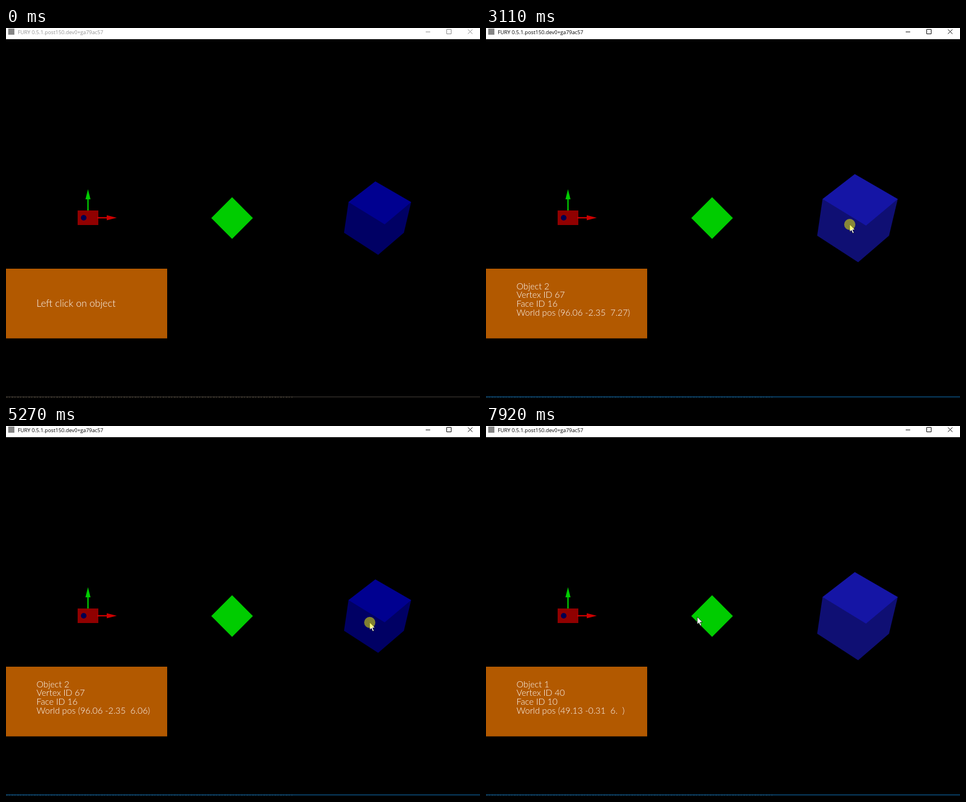
Animation of 847 by 661 pixels, one loop 8000 ms. Source, as an HTML page:

```html
<!DOCTYPE html>
<html lang="en">
<head>
<meta charset="utf-8">
<title>Picking objects</title>
<style>
  html, body { margin: 0; width: 100%; height: 100%; overflow: hidden; background: #000; }
  svg { display: block; width: 847px; height: 661px; }
  text { white-space: pre; }
  #bar text { font: 9.3px "Open Sans", "Noto Sans", sans-serif; }
  #panel text { font: 300 15.7px Lato, "Open Sans", sans-serif; fill: #fff; }
  #panel #hint { font-size: 17.5px; }
</style>
</head>
<body>
<svg viewBox="0 0 847 661">
  <rect width="847" height="661"/>
  <g id="bar">
    <rect width="847" height="20" fill="#fff"/>
    <rect x="4" y="1" width="11" height="11" fill="#858585"/>
    <text id="title" x="21" y="11">FURY 0.5.1.post150.dev0+ga79ac57</text>
    <path id="controls" d="M750 7h8M787.5 2.5h8v8h-8zM825.5 2.5l8 8m0-8l-8 8" fill="none"/>
  </g>

  <g id="axes">
    <rect x="128" y="326" width="37" height="26" fill="#900000"/>
    <circle cx="138.8" cy="339" r="5" fill="#000050"/>
    <path d="M146.5 326V304" stroke="#00cc00" stroke-width="2.4"/>
    <path d="M146.5 288L151 306H142Z" fill="#00cc00"/>
    <path d="M163 339H181" stroke="#cc0000" stroke-width="2.4"/>
    <path d="M198 339L180 343.5V334.5Z" fill="#cc0000"/>
  </g>
  <polygon id="diamond" points="0,-37.2 37.2,0 0,37.2 -37.2,0"/>
  <g id="cube">
    <polygon id="cubeSides" points="-53,-28 -5,-40 59,-28 46,26.7 0,66.3 -61,26.7"/>
    <polygon id="cubeTop" points="-5,-65 59,-28 11.7,11.7 -53,-28"/>
  </g>

  <g id="panel">
    <rect y="430" width="288" height="124.5" fill="#b25900"/>
    <text id="hint" x="54.5" y="498">Left click on object</text>
    <g id="info">
      <text x="54.5" y="466.5"/><text x="54.5" y="482.3"/>
      <text x="54.5" y="498.1"/><text x="54.5" y="513.9"/>
    </g>
  </g>

  <rect id="edge" y="658" width="847" height="2"/>
  <path id="edgeDots" d="M0 659.5H512" stroke-dasharray="3 2 2 3"/>

  <path id="cursor" d="M0 0V13.2L3 10.5L5.3 15.8L7.5 14.8L5.2 9.6H9.4Z"
        fill="#fff" stroke="#000" stroke-width=".7"/>
  <circle id="press" r="10" fill="#ff0" fill-opacity=".5"/>
</svg>
<script>
const LOOP = 8000;
const ACTIVATED = 1770;
const STEP = 75;
const HOLD = 100;
const $ = id => document.getElementById(id);
const set = (id, attrs) => {
  for (const name in attrs) $(id).setAttribute(name, attrs[name]);
};
const show = (id, visible) => set(id, { visibility: visible ? 'visible' : 'hidden' });

const cube = {
  id: 'cube', index: 2, vertex: 67, face: 16, depth: 6.06, x: 665, y: 339,
  clicks: [2070, 2710, 3110, 3480, 3900, 4340, 4670, 5210, 5690]
};
const diamond = {
  id: 'diamond', index: 1, vertex: 40, face: 10, depth: 6, x: 404, y: 339.5,
  clicks: [6580, 6910, 7300, 7680]
};

// Pointer stops: when each move starts and ends, and where it leads.
const stops = [
  { start: 0, end: 0, x: 757, y: 647 },
  { start: 70, end: 510, x: 689, y: 537 },
  { start: 830, end: 1070, x: 571, y: 427 },
  { start: 1145, end: 1370, x: 689, y: 318 },
  { start: 1530, end: 1610, x: 657, y: 331 },
  { start: 2220, end: 2570, x: 650, y: 351 },
  { start: 5900, end: 6060, x: 470, y: 345 },
  { start: 6210, end: 6510, x: 399, y: 340.1 },
  { start: 7920, end: 7920, x: 377.5, y: 341 }
];

// The pointer advances in even jumps of STEP milliseconds.
function pointerAt(t) {
  const next = stops.findLastIndex(stop => stop.start <= t);
  const to = stops[next], from = stops[Math.max(0, next - 1)];
  const elapsed = (Math.floor((t - to.start) / STEP) + 1) * STEP;
  const u = Math.min(1, elapsed / (to.end - to.start + STEP));
  return { x: from.x + (to.x - from.x) * u, y: from.y + (to.y - from.y) * u };
}

const clicksBy = (object, t) => object.clicks.filter(click => click <= t);
const isSelected = (object, t) => clicksBy(object, t).length % 2 === 1;
const scaleOf = (object, t) => isSelected(object, t) ? 1.2 : 1;

// A selected object is lifted towards white before lighting.
function shade(channel, light, selected) {
  const lift = selected ? 30 : 0;
  const rgb = [0, 1, 2].map(c => Math.round(((c === channel ? 204 : 0) + lift) * light));
  return `rgb(${rgb})`;
}

function drawObjects(t) {
  for (const object of [cube, diamond]) {
    set(object.id, { transform: `translate(${object.x} ${object.y}) scale(${scaleOf(object, t)})` });
  }
  set('cubeTop', { fill: shade(2, 0.705, isSelected(cube, t)) });
  set('cubeSides', { fill: shade(2, 0.49, isSelected(cube, t)) });
  set('diamond', { fill: shade(1, 1, isSelected(diamond, t)) });
}

// World coordinates under the pointer, padded to two decimals.
function worldPosition(object, t) {
  const { x, y } = pointerAt(t);
  const unit = 5.348;
  const values = [50 + (x - 403.65) / unit, (338.42 - y) / unit, object.depth * scaleOf(object, t)];
  return values.map(value => {
    const [whole, decimals = ''] = String(+value.toFixed(2)).split('.');
    return `${whole}.${decimals.padEnd(2)}`.padStart(5);
  }).join(' ');
}

function drawPanel(t) {
  const picked = [diamond, cube].find(object => clicksBy(object, t).length);
  show('hint', !picked);
  show('info', picked);
  if (!picked) return;
  const lines = [
    `Object ${picked.index}`,
    `Vertex ID ${picked.vertex}`,
    `Face ID ${picked.face}`,
    `World pos (${worldPosition(picked, clicksBy(picked, t).pop())})`
  ];
  lines.forEach((line, i) => { $('info').children[i].textContent = line; });
}

function drawWindow(active) {
  set('title', { fill: active ? '#000' : '#929292' });
  set('controls', { stroke: active ? '#000' : '#858585' });
  set('edge', { fill: active ? '#083c62' : '#25221f' });
  set('edgeDots', { stroke: active ? '#1c5a80' : '#5c5344' });
}

function drawPointer(t) {
  const { x, y } = pointerAt(t);
  const presses = [ACTIVATED, ...cube.clicks, ...diamond.clicks];
  set('cursor', { transform: `translate(${x} ${y})` });
  set('press', { cx: x, cy: y });
  show('cursor', t >= stops[1].start);
  show('press', presses.some(down => t >= down && t < down + HOLD));
}

function draw(t) {
  drawWindow(t >= ACTIVATED);
  drawObjects(t);
  drawPanel(t);
  drawPointer(t);
}

const origin = performance.now();
function tick() {
  draw((performance.now() - origin) % LOOP);
  requestAnimationFrame(tick);
}
tick();
</script>
</body>
</html>
```
